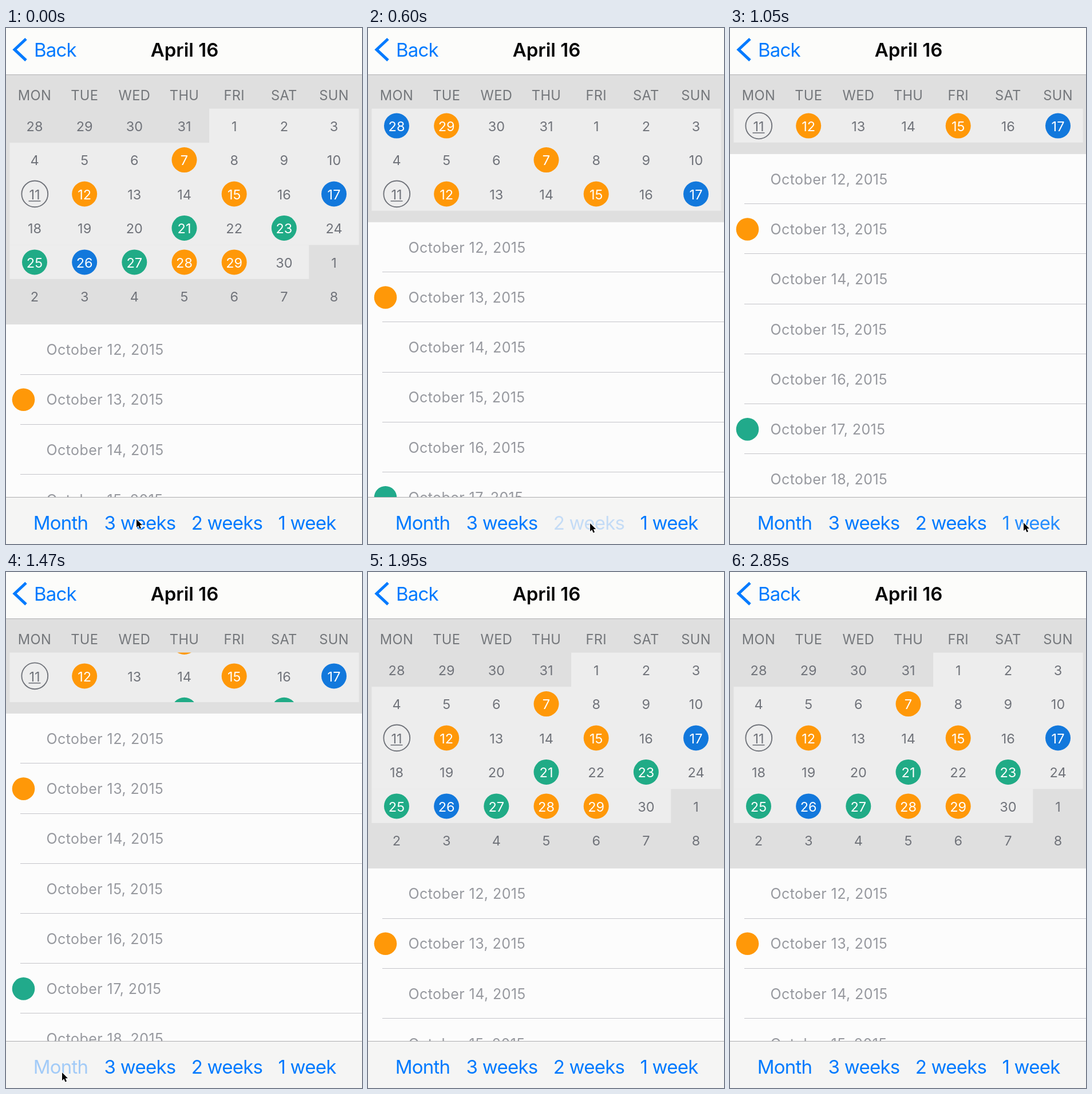
Write an HTML page with a canvas that moves like this. It is 622x900 px and loops after 2880 ms.

```html
<!DOCTYPE html>
<html lang="en">
<head>
<meta charset="utf-8">
<title>Calendar</title>
<style>
html, body { margin: 0; width: 100%; height: 100%; overflow: hidden; background: #fcfcfc; }
canvas { display: block; }
</style>
</head>
<body>
<canvas id="stage" width="622" height="900"></canvas>
<script>
const ctx = document.getElementById('stage').getContext('2d');
const LOOP = 2880, TICK = 30, SLIDE = 120, FADE = 150;
const W = 622, H = 900, NAV = 81, BAR = 818;
const COL = 87.17, ROW = 59.45, LEFT = 6.4, TOP = 140.6;
const FONT = 'Inter, Roboto, sans-serif';
const BLUE = '#007aff', ORANGE = '#ff9808', NAVY = '#1278dc', GREEN = '#20ab86';

const DAYS = ['MON', 'TUE', 'WED', 'THU', 'FRI', 'SAT', 'SUN'];
const BUTTONS = [['Month', 95.5], ['3 weeks', 234], ['2 weeks', 386], ['1 week', 526]];
const TODAY = 14;
const marks = new Map();
[1, 10, 15, 18, 31, 32].forEach(i => marks.set(i, ORANGE));
[0, 20, 29].forEach(i => marks.set(i, NAVY));
[24, 26, 28, 30].forEach(i => marks.set(i, GREEN));

// rows: visible weeks, skip: weeks scrolled off the top
const VIEWS = [
  { at: -LOOP, button: 0, rows: 6, skip: 0, title: 'April 16' },
  { at: 90, button: 1, rows: 3, skip: 0, title: 'March 16' },
  { at: 600, button: 2, rows: 2, skip: 1, title: 'April 16' },
  { at: 930, button: 3, rows: 1, skip: 2, title: 'April 16' },
  { at: 1444.4, button: 0, rows: 6, skip: 0, title: 'April 16' }
];

// time, x, y of the pointer tip
const PATH = [
  [0, 228, 857], [90, 237, 859], [270, 252, 862], [510, 384, 864], [660, 390, 864],
  [840, 513, 863], [1110, 513, 863], [1380, 98, 873], [1500, 98, 873], [1650, 98, 905]
];

const clamp = v => Math.max(0, Math.min(1, v));
const mix = (a, b, p) => a + (b - a) * p;
const ease = p => p < 0.5 ? 2 * p * p : 1 - 2 * (1 - p) * (1 - p);

function rect(x, y, w, h, color) {
  ctx.fillStyle = color;
  ctx.fillRect(x, y, w, h);
}

function disc(x, y, r, color) {
  ctx.fillStyle = color;
  ctx.beginPath();
  ctx.arc(x, y, r, 0, Math.PI * 2);
  ctx.fill();
}

// y is the middle of the capitals
function label(str, x, y, size, color, { weight = 400, align = 'center', gap = 0 } = {}) {
  ctx.font = `${weight} ${size}px ${FONT}`;
  ctx.letterSpacing = gap + 'px';
  ctx.textAlign = align;
  ctx.fillStyle = color;
  ctx.fillText(str, x, y + size * 0.364);
}

function viewAt(t) {
  let n = 0;
  VIEWS.forEach((v, i) => { if (t >= v.at) n = i; });
  const to = VIEWS[n], from = VIEWS[Math.max(0, n - 1)];
  const p = ease(clamp((t - to.at) / SLIDE));
  return {
    rows: mix(from.rows, to.rows, p),
    skip: mix(from.skip, to.skip, p),
    month: to.rows === 6,
    title: to.title
  };
}

function drawList(bottom) {
  for (let i = 0; i < 8; i++) {
    const y = bottom + 87.2 * i;
    if (y > BAR) break;
    const mid = y + 44;
    if (i === 1) disc(30.5, mid, 19.8, ORANGE);
    if (i === 5) disc(30.5, mid, 19.8, '#21aa8b');
    label(`October ${12 + i}, 2015`, 70.5, mid, 25, '#97999f', { align: 'left', gap: 0.43 });
    rect(25, Math.round(y + 86.4), W - 25, 1, '#c5c5ca');
  }
}

function drawDay(i, view) {
  const x = 50 + (i % 7) * COL;
  const row = Math.floor(i / 7) - view.skip;
  const y = 170.6 + row * ROW;
  const inMonth = i >= 4 && i < 34;
  const num = i < 4 ? 28 + i : inMonth ? i - 3 : i - 33;
  const mark = (inMonth || !view.month) && marks.get(i);
  const ink = '#70737a';
  if (mark) disc(x, y, 22, mark);
  label(String(num), x, y + 0.6, 23.5, mark ? '#fff' : ink);
  if (i === TODAY) {
    ctx.strokeStyle = ink;
    ctx.lineWidth = 1.9;
    ctx.beginPath();
    ctx.arc(x + 0.3, y - 0.1, 22.9, 0, Math.PI * 2);
    ctx.stroke();
    rect(x - 10.5, y + 11.5, 21, 1.6, ink);
  }
}

function drawCalendar(view, bottom) {
  const light = '#ededed';
  rect(0, NAV, W, bottom - NAV, '#dfdfdf');
  DAYS.forEach((d, i) => label(d, 50 + i * COL, 117, 23.7, '#74777b', { gap: 0.3 }));
  ctx.save();
  ctx.beginPath();
  ctx.rect(0, TOP, W, bottom - 20 - TOP);
  ctx.clip();
  if (view.month) {
    const y = TOP - view.skip * ROW;
    rect(LEFT + 4 * COL, y, 3 * COL, ROW, light);
    rect(LEFT, y + ROW, 7 * COL, 3 * ROW, light);
    rect(LEFT, y + 4 * ROW, 6 * COL, ROW, light);
  } else {
    rect(LEFT, TOP, 7 * COL, H, light);
  }
  for (let i = 0; i < 42; i++) drawDay(i, view);
  ctx.restore();
}

function drawNav(title) {
  rect(0, 0, W, NAV, '#fcfcfa');
  rect(0, NAV, W, 1, '#b0b0b2');
  ctx.strokeStyle = BLUE;
  ctx.lineWidth = 5;
  ctx.beginPath();
  ctx.moveTo(35, 19);
  ctx.lineTo(15, 37.7);
  ctx.lineTo(35, 56.4);
  ctx.stroke();
  label('Back', 49, 37.8, 33, BLUE, { align: 'left', gap: -0.8 });
  label(title, 312, 37.9, 33, '#050505', { weight: 600 });
}

function drawBar(t) {
  rect(0, BAR, W, H - BAR, '#f5f5f4');
  rect(0, BAR, W, 1, '#aeaeb0');
  BUTTONS.forEach(([str, x], i) => {
    let alpha = 1;
    for (const v of VIEWS) {
      const age = t - v.at;
      if (v.button === i && age > -TICK && age < FADE) alpha = mix(0.2, 1, clamp(age / FADE));
    }
    ctx.globalAlpha = alpha;
    label(str, x, 862.6, 33, BLUE, { gap: -0.75 });
    ctx.globalAlpha = 1;
  });
}

function drawPointer(t) {
  const n = PATH.findIndex(p => p[0] > t);
  if (n < 1) return;
  const [t0, x0, y0] = PATH[n - 1], [t1, x1, y1] = PATH[n];
  const p = ease((t - t0) / (t1 - t0));
  ctx.save();
  ctx.translate(mix(x0, x1, p), mix(y0, y1, p));
  ctx.beginPath();
  [[0, 0], [0, 14], [3.2, 11], [5.6, 16.4], [8, 15.3], [5.7, 10.2], [10, 10]]
    .forEach(([x, y]) => ctx.lineTo(x, y));
  ctx.closePath();
  ctx.strokeStyle = '#fff';
  ctx.lineWidth = 2;
  ctx.stroke();
  ctx.fillStyle = '#000';
  ctx.fill();
  ctx.restore();
}

function draw(now) {
  const t = Math.floor((now % LOOP) / TICK) * TICK;
  const view = viewAt(t);
  const bottom = 160.4 + view.rows * ROW;
  rect(0, 0, W, H, '#fcfcfc');
  drawList(bottom);
  drawCalendar(view, bottom);
  drawNav(view.title);
  drawBar(t);
  drawPointer(t);
}

let start;
function frame(now) {
  if (start === undefined) start = now;
  draw(Math.max(0, now - start));
  requestAnimationFrame(frame);
}
draw(0);
requestAnimationFrame(frame);
</script>
</body>
</html>
```
